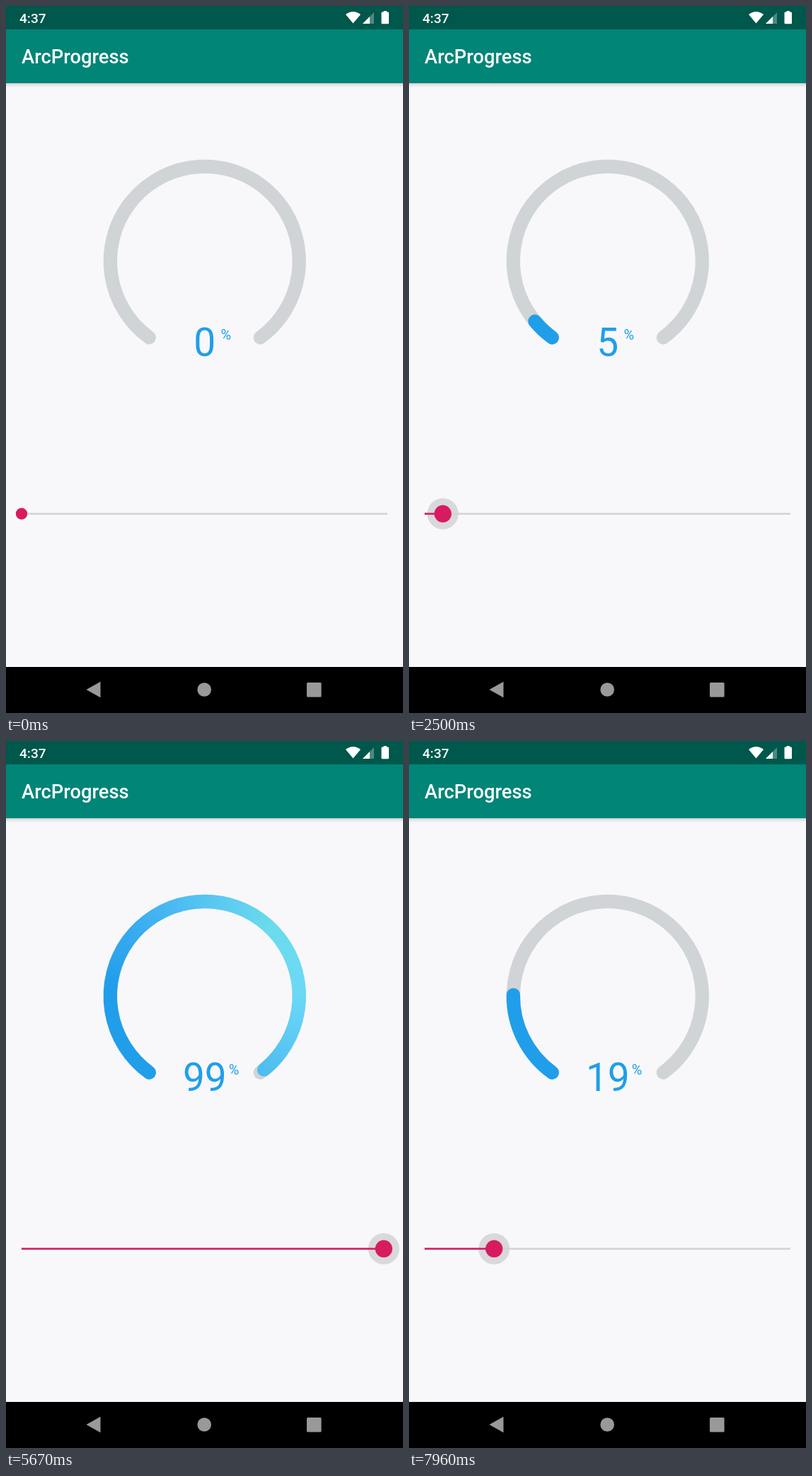
Recreate the animation shown at these times as an HTML page with a canvas. Size 561x998 px, loop 8000 ms.

```html
<!DOCTYPE html>
<html lang="en">
<head>
<meta charset="utf-8">
<title>ArcProgress</title>
<style>
  html, body { margin: 0; width: 100%; height: 100%; overflow: hidden; background: #f8f8fb; }
  canvas { display: block; width: 561px; height: 998px; }
</style>
</head>
<body>
<canvas id="stage" width="561" height="998"></canvas>
<script>
const ctx = document.getElementById('stage').getContext('2d');
const W = 561, H = 998, LOOP = 8000;
const FONT = 'Roboto, sans-serif';
const BLUE = '#219eea', PINK = '#d81b60';
const rad = deg => deg * Math.PI / 180;

const arc = { x: 280.8, y: 360, r: 133.5, start: 126, sweep: 288, width: 19.3 };
const slider = { x: 22, y: 716.8, w: 517 };
const PRESS = 2060;

// Drag path: [time in ms, percent]
const drag = [
  [0, 0], [2180, 0], [2500, 5.5], [3400, 39], [4340, 75.5], [5000, 92],
  [5640, 99.5], [5800, 99.5], [5900, 100], [6080, 100],
  [6750, 71.5], [7960, 19.5], [8000, 18]
];

// Slope at a key, flat wherever the direction turns
function slope(i) {
  if (i === 0 || i === drag.length - 1) return 0;
  const rate = k => (drag[k + 1][1] - drag[k][1]) / (drag[k + 1][0] - drag[k][0]);
  const a = rate(i - 1), b = rate(i);
  return a * b > 0 ? 2 * a * b / (a + b) : 0;
}

function percentAt(t) {
  let i = 0;
  while (i < drag.length - 2 && t >= drag[i + 1][0]) i++;
  const [t0, p0] = drag[i], [t1, p1] = drag[i + 1];
  const d = t1 - t0, u = (t - t0) / d, v = 1 - u;
  const p = (1 + 2 * u) * v * v * p0 + u * u * (3 - 2 * u) * p1
    + d * u * v * (v * slope(i) - u * slope(i + 1));
  return Math.max(0, Math.min(100, Math.floor(p + 1e-6)));
}

const sweepFill = ctx.createConicGradient(0, arc.x, arc.y);
[[0, '#6bd8f7'], [54, '#4dbcf0'], [110, BLUE], [188, BLUE], [225, '#3aacf1'],
 [270, '#57c5f2'], [315, '#6adcec'], [360, '#6bd8f7']]
  .forEach(([deg, color]) => sweepFill.addColorStop(deg / 360, color));

function rect(x, y, w, h, color) {
  ctx.fillStyle = color;
  ctx.fillRect(x, y, w, h);
}

function disc(x, y, r, color) {
  ctx.fillStyle = color;
  ctx.beginPath();
  ctx.arc(x, y, r, 0, 2 * Math.PI);
  ctx.fill();
}

function poly(points, color) {
  ctx.fillStyle = color;
  ctx.beginPath();
  points.forEach(p => ctx.lineTo(...p));
  ctx.closePath();
  ctx.fill();
}

function roundBox(x, y, w, h, r, color) {
  ctx.fillStyle = color;
  ctx.beginPath();
  ctx.roundRect(x, y, w, h, r);
  ctx.fill();
}

function text(str, x, y, size, color, weight = 400, align = 'left') {
  ctx.font = `${weight} ${size}px ${FONT}`;
  ctx.textAlign = align;
  ctx.fillStyle = color;
  ctx.fillText(str, x, y);
}

function drawBars() {
  const shadow = ctx.createLinearGradient(0, 109, 0, 115);
  shadow.addColorStop(0, 'rgba(0,0,0,.15)');
  shadow.addColorStop(1, 'rgba(0,0,0,0)');
  rect(0, 109, W, 6, shadow);
  rect(0, 32, W, 77, '#008577');
  rect(0, 0, W, 33, '#00574b');
  text('4:37', 19, 24, 19.1, '#fff', 500);
  text('ArcProgress', 22, 81.3, 27.3, '#fff', 500);

  // Wi-Fi, signal, battery
  ctx.fillStyle = '#fff';
  ctx.beginPath();
  ctx.moveTo(490.5, 24.5);
  ctx.lineTo(480, 12);
  ctx.quadraticCurveTo(490.5, 4, 501, 12);
  ctx.fill();
  poly([[504, 25], [520, 9], [520, 25]], 'rgba(255,255,255,.3)');
  poly([[504, 25], [514, 15], [514, 25]], '#fff');
  roundBox(530.5, 8.5, 10.5, 16.8, 1.2, '#fff');
  rect(533.5, 7, 4.5, 2, '#fff');

  rect(0, 933, W, H - 933, '#000');
  poly([[113.5, 965], [133.5, 953.8], [133.5, 976.2]], '#999');
  disc(280.2, 965, 9.8, '#999');
  roundBox(425, 955, 20.6, 20.6, 1.5, '#999');
}

function strokeArc(part, color) {
  ctx.lineWidth = arc.width;
  ctx.lineCap = 'round';
  ctx.strokeStyle = color;
  ctx.beginPath();
  ctx.arc(arc.x, arc.y, arc.r, rad(arc.start), rad(arc.start + arc.sweep * part));
  ctx.stroke();
}

function drawGauge(percent) {
  strokeArc(1, '#d0d4d7');
  if (percent > 0) strokeArc(percent / 100, sweepFill);
  const label = String(percent);
  text(label, arc.x, 494.3, 55, BLUE, 400, 'center');
  text('%', 299.6 + 11.2 * label.length, 471, 20, BLUE, 400, 'center');
}

function drawSlider(percent, press) {
  const { x, y, w } = slider;
  const knob = x + w * percent / 100;
  if (press > 0) disc(knob, y, 22 * press, `rgba(0,0,0,${0.125 * press})`);
  rect(x, y - 1.3, w, 2.6, '#d3d2d5');
  rect(x, y - 1.3, knob - x, 2.6, PINK);
  disc(knob, y, 8.2 + 4 * press, PINK);
}

function draw(t) {
  const percent = percentAt(t);
  const press = Math.max(0, Math.min(1, (t - PRESS) / 170));
  rect(0, 0, W, H, '#f8f8fb');
  drawBars();
  drawGauge(percent);
  drawSlider(percent, press);
}

const begin = performance.now();
function tick() {
  draw((performance.now() - begin) % LOOP);
  requestAnimationFrame(tick);
}
tick();
</script>
</body>
</html>
```
